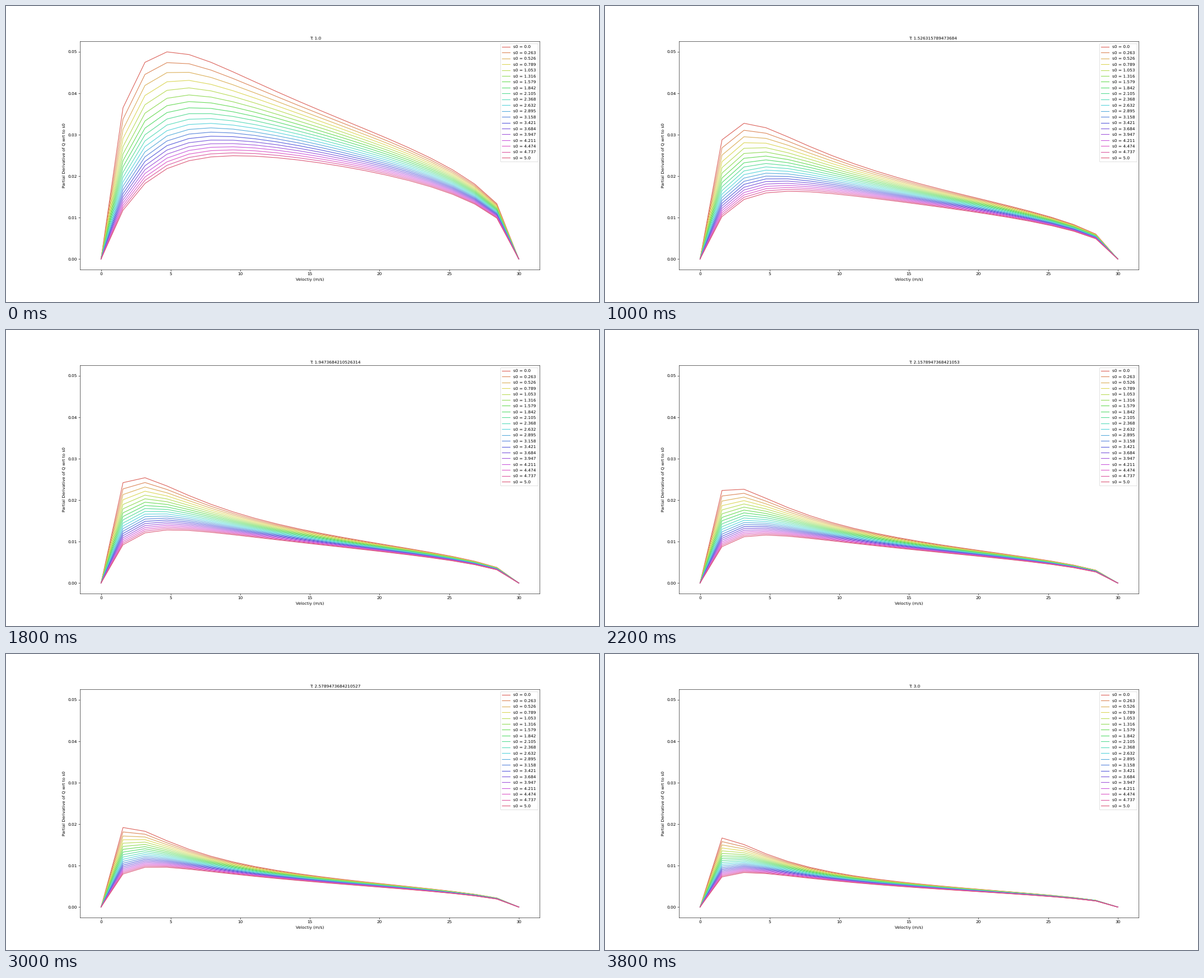
These frames come from a looping animation (1058 px wide and 529 px high, 4000 ms). A matplotlib script:

```python
import colorsys

import matplotlib.pyplot as plt
import numpy as np
from matplotlib.animation import FuncAnimation

plt.rcParams["font.family"] = "DejaVu Sans"
plt.rcParams["text.hinting"] = "none"

N = 20              # speeds, gaps, headways and frames alike
V_MAX = 30.0        # desired speed, m/s
CAR_LENGTH = 5.0    # m

speeds = np.linspace(0, V_MAX, N)
gaps = np.linspace(0, 5, N)
headways = np.linspace(1, 3, N)
colors = [colorsys.hls_to_rgb((i / N + 0.01) % 1, 0.6, 0.65) for i in range(N)]


def flow_slope(s0, headway):
    """Size of dQ/ds0 for equilibrium car-following traffic."""
    g = np.sqrt(1 - (speeds / V_MAX) ** 4)
    room = s0 + speeds * headway + CAR_LENGTH * g
    return speeds * g / room ** 2


fig, ax = plt.subplots(figsize=(20, 10), dpi=52.9)
lines = [
    ax.plot(speeds, flow_slope(s0, headways[0]), color=color,
            label=f"s0 = {round(float(s0), 3)}")[0]
    for s0, color in zip(gaps, colors)
]
top = flow_slope(gaps[0], headways[0]).max()
ax.set_xlim(-0.05 * V_MAX, 1.05 * V_MAX)
ax.set_ylim(-0.05 * top, 1.05 * top)
ax.set_xlabel("Veloctiy (m/s)")
ax.set_ylabel("Partial Derivative of Q wrt to s0")
ax.legend(loc="upper right")
title = ax.text(0.5, 1.01, "", transform=ax.transAxes)


def update(i):
    headway = headways[i]
    for line, s0 in zip(lines, gaps):
        line.set_ydata(flow_slope(s0, headway))
    title.set_text(f"T: {float(headway)}")
    return [*lines, title]


anim = FuncAnimation(fig, update, frames=N, init_func=lambda: update(0),
                     interval=200, repeat=True, repeat_delay=0)
plt.show()
```
